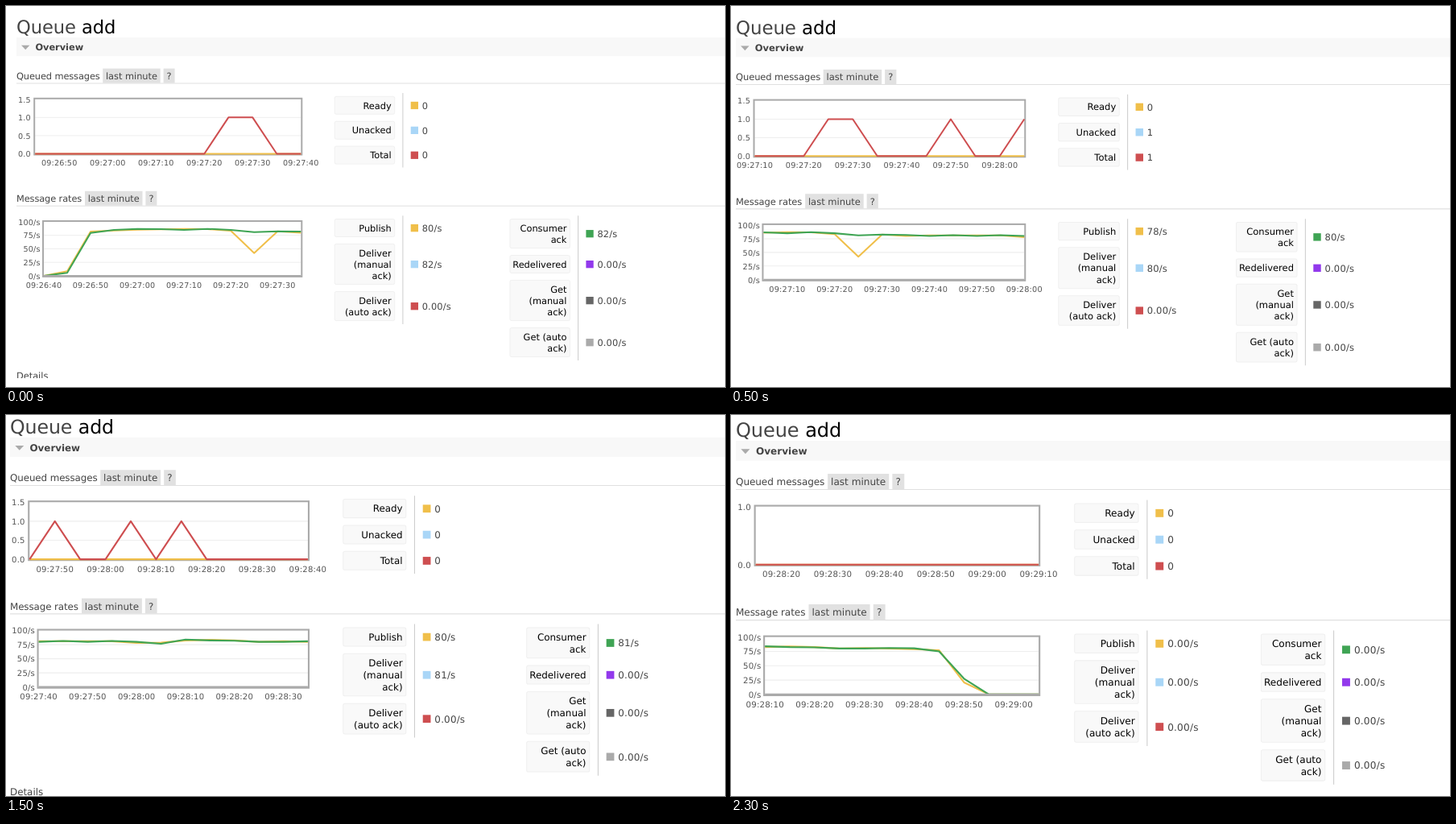
Recreate the animation shown at these times as an HTML page. Size 893x473 px, loop 2.5 s.

```html
<!DOCTYPE html>
<html lang="en">
<head>
<meta charset="utf-8">
<title>Queue overview</title>
<style>
  html, body { margin: 0; width: 100%; height: 100%; overflow: hidden; background: #fff; }
  #stage { display: block; width: 893px; height: 473px; }
  text { font: 11.35px "DejaVu Sans", sans-serif; fill: #444; text-rendering: geometricPrecision; }
  .title { font-size: 22.6px; letter-spacing: -.08px; }
  .label { letter-spacing: -.09px; }
  .bold { font-weight: bold; }
  .dark { fill: #000; }
  .value { letter-spacing: .2px; }
  .tick { font-size: 9.6px; letter-spacing: .17px; fill: #545454; }
  .mid { text-anchor: middle; }
  .end { text-anchor: end; }
  .line { fill: none; stroke-width: 2; stroke-linejoin: round; }
  .frame { fill: none; stroke: #aaa; stroke-width: 2; }
  .grid { stroke: #eee; }
  .rule { stroke: #e0e0e0; }
  .bar { stroke: #ccc; }
  .tag { fill: #e1e1e1; }
  .cell { fill: #f9f9f9; stroke: #f0f0f0; }
</style>
</head>
<body>
<svg id="stage" viewBox="0 0 893 473"></svg>
<script>
const STEP = 500;
const YELLOW = '#f0bf4a', BLUE = '#a9d6f7', RED = '#ce4e50', GREEN = '#3fa454',
      PURPLE = '#9239ec', DARK = '#666', GREY = '#aaa';

// One sample every five seconds, starting at 09:26:40.
const FIRST = 9 * 3600 + 26 * 60 + 40;
const published = [0, 8.5, 82, 84, 85.5, 86, 87, 86.5, 83.5, 42, 82.5, 80, 81, 81, 81,
  81, 78, 78.5, 82.5, 83.5, 82.5, 80, 81, 80, 79, 77, 21, 0, 0, 0];
const acked = [0, 5.5, 79.5, 85, 87, 86.5, 85, 87, 85, 81, 82.5, 82, 80, 81.5, 80,
  81.5, 80, 76.5, 84, 82.5, 82, 80, 80, 81, 80.5, 75, 27.5, 0, 0, 0];

// x, y and zoom place the page; h is its visible height; from is the first sample.
const views = [
  { x: 13,  y: 0,     zoom: 1,      h: 462, from: 0,  total: '000000001100', top: 1.5, now: 0, pub: '80/s', ack: '82/s' },
  { x: 6,   y: .2,    zoom: 1.014,  h: 459, from: 5,  total: '000110001001', top: 1.5, now: 1, pub: '78/s', ack: '80/s' },
  { x: 9.5, y: -4.1,  zoom: 1.0236, h: 465, from: 9,  total: '000010010100', top: 1.5, now: 0, pub: '82/s', ack: '82/s' },
  { x: 5,   y: -13,   zoom: 1.047,  h: 473, from: 12, total: '010010100000', top: 1.5, now: 0, pub: '80/s', ack: '81/s' },
  { x: 6,   y: -9.6,  zoom: 1.0645, h: 473, from: 18, total: '000000000000', top: 1,   now: 0, pub: '0.00/s', ack: '0.00/s' }
];

const text = (x, y, s, cls = '') => `<text x="${x}" y="${y}" class="${cls}">${s}</text>`;
const box = (x, y, w, h, attrs) => `<rect x="${x}" y="${y}" width="${w}" height="${h}" ${attrs}/>`;
const line = (x1, y1, x2, y2, cls) => `<line x1="${x1}" y1="${y1}" x2="${x2}" y2="${y2}" class="${cls}"/>`;

function clock(sample) {
  const s = FIRST + sample * 5;
  return [s / 3600, s / 60 % 60, s % 60].map(n => String(Math.floor(n)).padStart(2, '0')).join(':');
}

function heading(y, label, tagX) {
  return text(13, y + 4.1, label, 'label') +
    box(tagX, y - 9.2, 71.5, 18, 'class="tag"') + text(tagX + 3.7, y + 4.1, 'last minute') +
    box(tagX + 75.4, y - 9.2, 14, 18, 'class="tag"') + text(tagX + 82.4, y + 4.1, '?', 'mid') +
    line(13, y + 9.2, 910, y + 9.2, 'rule');
}

// The border lies just outside the plot area.
function chart({ left, right, top, bottom, max, ticks, label, from, series, gap }) {
  const dx = (right - left) / 11;
  const py = v => bottom - v / max * (bottom - top);
  let out = '';
  ticks.forEach(v => {
    if (v > 0 && v < max) out += line(left, py(v), right, py(v), 'grid');
    out += text(left - gap, py(v) + 3.7, label(v), 'tick end');
  });
  for (let i = 0; i < 12; i++) {
    if ((from + i) % 2 === 0) out += text(left + i * dx, bottom + 14.8, clock(from + i), 'tick mid');
  }
  out += box(left - 1, top - 1, right - left + 2, bottom - top + 2, 'class="frame"');
  for (const [color, data] of series) {
    const pts = data.map((v, i) => `${left + i * dx},${py(v)}`).join(' ');
    out += `<polyline class="line" stroke="${color}" points="${pts}"/>`;
  }
  return out;
}

// Each row: label lines, colour, value.
function legend(x, y, rows) {
  const start = y - 3.7;
  let out = '';
  for (const [label, color, value] of rows) {
    const lines = label.split('|'), h = 23 + 14.1 * (lines.length - 1), mid = y + h / 2;
    out += box(x + .5, y + .5, 74.5, h - 1, 'rx="2" class="cell"');
    lines.forEach((s, i) => out += text(x + 71, y + 15.7 + 14.1 * i, s, 'dark end'));
    out += box(x + 95, mid - 4.5, 9.3, 9.3, `fill="${color}"`) + text(x + 109, mid + 4.3, value, 'value');
    y += h + 7.9;
  }
  return out + line(x + 85.2, start, x + 85.2, y - 4, 'bar');
}

function page(v) {
  const zero = Array(12).fill(0), total = [...v.total].map(Number);
  const span = data => data.slice(v.from, v.from + 12);
  const idle = '0.00/s';
  return text(13, 34, 'Queue <tspan class="dark">add</tspan>', 'title') +
    box(13, 39, 900, 23.3, 'fill="#f8f8f8"') +
    '<path d="M19 48.7h10.4l-5.2 5.6z" fill="#aaa"/>' +
    text(36.4, 55.2, 'Overview', 'bold') +
    heading(86.8, 'Queued messages', 120.2) +
    chart({
      left: 36.2, right: 366.3, top: 115.8, bottom: 183.5, max: v.top, gap: 5.4, from: v.from + 1,
      ticks: v.top > 1 ? [0, .5, 1, 1.5] : [0, 1], label: n => n.toFixed(1),
      series: [[YELLOW, zero], [RED, total]]
    }) +
    legend(407.7, 111.8, [['Ready', YELLOW, 0], ['Unacked', BLUE, v.now], ['Total', RED, v.now]]) +
    heading(239, 'Message rates', 98) +
    chart({
      left: 47, right: 366.3, top: 268, bottom: 334.9, max: 100, gap: 4.4, from: v.from,
      ticks: [0, 25, 50, 75, 100], label: n => n + '/s',
      series: [[YELLOW, span(published)], [GREEN, span(acked)], [GREY, zero]]
    }) +
    legend(407.7, 264, [['Publish', YELLOW, v.pub], ['Deliver|(manual|ack)', BLUE, v.ack],
      ['Deliver|(auto ack)', RED, idle]]) +
    legend(625.4, 264, [['Consumer|ack', GREEN, v.ack], ['Redelivered', PURPLE, idle],
      ['Get|(manual|ack)', DARK, idle], ['Get (auto|ack)', GREY, idle]]) +
    text(13, 463, 'Details');
}

const stage = document.getElementById('stage');
stage.innerHTML = views.map(v =>
  `<svg width="893" height="${v.h}" overflow="hidden" visibility="hidden">
    <g transform="translate(${v.x} ${v.y}) scale(${v.zoom}) translate(-13 0)">${page(v)}</g>
  </svg>`).join('');

const pages = [...stage.children];
let start, shown;
function show(now) {
  start ??= now;
  const i = Math.max(0, Math.floor((now - start) / STEP)) % pages.length;
  if (i !== shown) {
    pages.forEach((p, k) => p.setAttribute('visibility', k === i ? 'visible' : 'hidden'));
    shown = i;
  }
  requestAnimationFrame(show);
}
show(performance.now());
</script>
</body>
</html>
```
